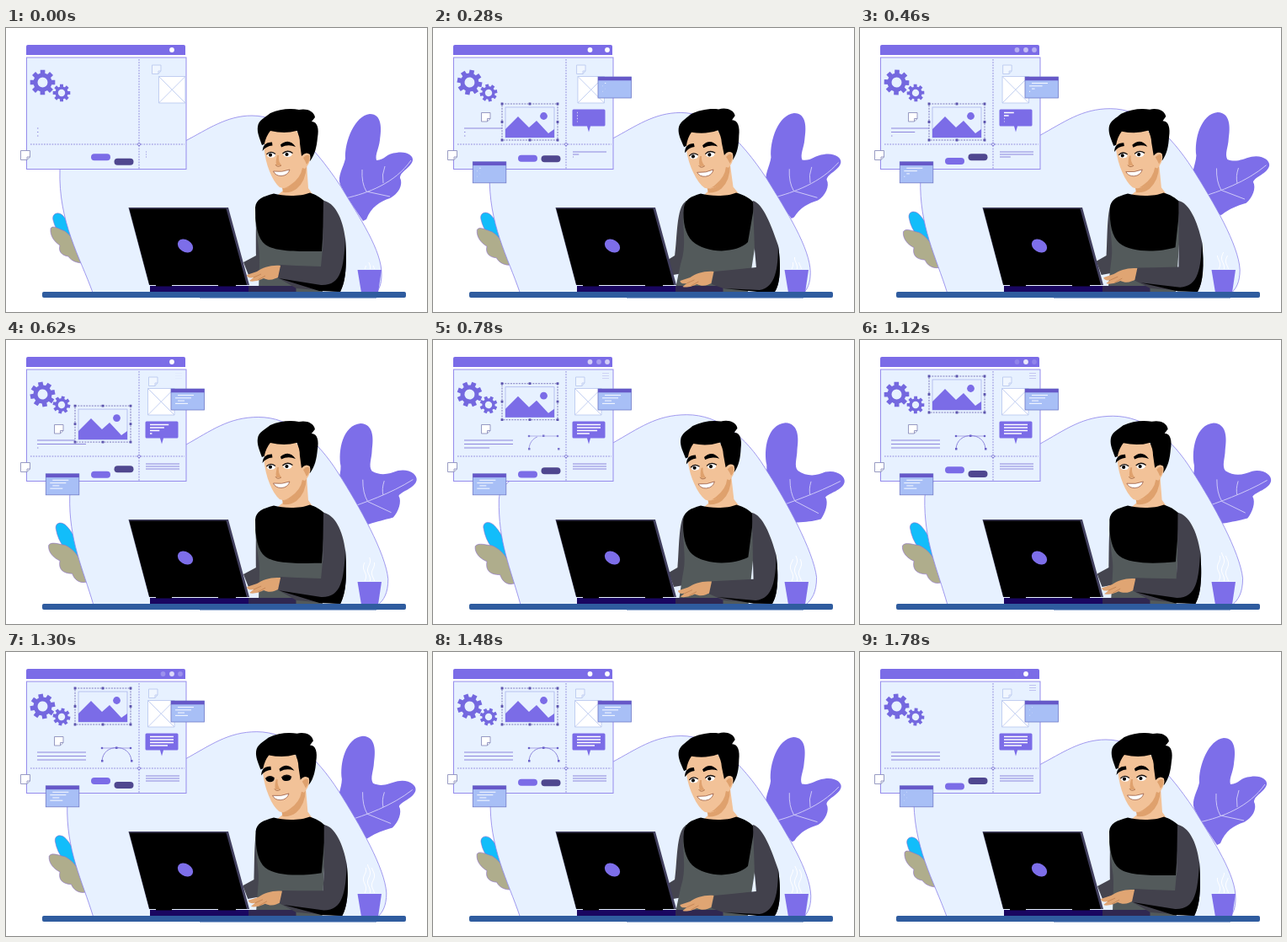
An HTML page for the animation above (1800 ms loop, 500x337 px).

```html
<!DOCTYPE html>
<html lang="en">
<head>
<meta charset="utf-8">
<title>Designer at work</title>
<style>
html, body { margin: 0; width: 100%; height: 100%; overflow: hidden; background: #fff; }
svg { display: block; width: 100%; height: 100%; }
.line { fill: none; stroke: #8d86dc; stroke-width: 1; }
.thin { stroke-width: .7; }
.faint { stroke: #c0c2f1; }
.pale { fill: #fff; stroke: #bccaf0; stroke-width: .9; }
.vein { fill: none; stroke: #cfcaf8; stroke-width: 1; }
.white { fill: none; stroke: #fff; stroke-width: 1.5; }
</style>
</head>
<body>
<svg viewBox="0 0 500 337">
  <!-- plants behind the backdrop -->
  <g stroke="#8b70cf" stroke-width=".6">
    <path fill="#12bdfa" data-by="swell"
      d="M56 228 C54 221 61 217 67 222 C76 231 80 246 82 258 C70 252 59 242 56 228Z"
      data-to="M60 222 C60 215 68 214 74 221 C84 232 88 245 90 262 C74 254 63 242 60 222Z"/>
    <path fill="#afad8c" data-by="swell"
      d="M53 238 C55 233 64 239 70 241 C80 248 89 264 92 279 C84 279 77 276 74 271 C66 270 62 265 64 258 C58 254 52 247 53 238Z"
      data-to="M50 245 C54 240 64 244 70 244 C86 250 96 270 98 289 C88 293 82 286 80 279 C68 279 62 274 64 263 C56 260 49 253 50 245Z"/>
  </g>
  <path fill="#7d6ee9" data-by="swell"
    d="M424 229 L404 199 L397 186 C393 176 401 165 403 155 C402 135 414 104 432 102 C447 102 446 120 444 133 C443 143 438 150 440 157 C450 157 452 148 464 148 C476 146 484 152 483 157 C481 166 468 170 468 178 C472 186 466 197 456 202 C444 206 434 212 428 227Z"
    data-to="M432 216 L414 203 L394 182 C391 172 397 160 396 148 C392 130 396 100 418 98 C434 99 434 116 432 130 C432 140 428 149 433 155 C444 163 456 162 466 157 C480 154 490 162 489 169 C487 179 470 182 466 187 C470 193 466 206 461 213 C450 216 444 216 432 216Z"/>
  <path class="vein" data-by="swell"
    d="M403 202 C430 196 462 184 481 157 M428 194 Q422 184 423 168 M428 194 L456 200 M448 184 Q446 174 450 164"
    data-to="M404 200 C425 192 455 182 484 168 M430 191 Q424 181 424 165 M430 191 L458 206 M448 184 Q446 178 449 168"/>

  <path fill="#e7f1ff" stroke="#8b80ea" stroke-width=".8" data-by="swell"
    d="M103 314 C88 272 62 230 64 168 C64 140 180 150 213 134 C240 120 262 104 292 104 C330 104 362 135 397 187 C420 225 447 265 446 293 C446 304 443 310 440 314Z"
    data-to="M104 314 C92 270 78 240 79 190 C80 150 180 138 213 122 C245 104 265 88 302 88 C340 88 372 114 394 150 C420 190 452 250 456 281 C456 300 450 308 443 314Z"/>

  <!-- design window -->
  <path fill="#7b6ce7" d="M24 32 V22 Q24 20 26 20 H211 Q213 20 213 22 V32Z"/>
  <g fill="#fff">
    <circle class="outer" cx="186.500" cy="26" r="2.900"/>
    <circle class="inner" cx="197" cy="26" r="2.900"/>
    <circle class="outer" cx="207" cy="26" r="2.900"/>
  </g>
  <rect x="24.500" y="35" width="189.500" height="132.500" fill="#e7f1ff" stroke="#958bec"/>
  <path class="line" stroke-dasharray="1.700 1.500" d="M158 37 V167 M29 138 H212"/>
  <circle cx="158" cy="138" r="1.600" fill="#e7f1ff" stroke="#7165cf" stroke-width=".8"/>
  <g id="big"></g>
  <g id="small"></g>
  <path fill="#fff" stroke="#8d90bd" stroke-width=".9" d="M17.500 145.500 H28.500 V153 L25 156.500 H17.500Z M25 156.500 V153 H28.500"/>
  <path id="memo" class="pale" fill-opacity=".4" d="M169.500 44 H180 V51 L177 54.500 H169.500Z M177 54.500 V51 H180"/>
  <path id="box" class="pale" d="M168.500 57.500 H200 V89 H168.500Z L200 89 M200 57.500 L168.500 89"/>
  <path id="menu" class="line faint" d="M201 39.500 H209 M201 42.500 H209 M201 45.500 H209" opacity="0"/>

  <g class="line">
    <path class="draw" data-on="0 310" d="M37 119 H95"/>
    <path class="draw" data-on="310 620" d="M37 123.500 H95"/>
    <path class="draw" data-on="620 930" d="M37 128 H95"/>
    <path class="draw" data-on="0 200" d="M166 147 H206"/>
    <path class="draw" data-on="250 420" d="M166 150 H206"/>
    <path class="draw" data-on="400 590" d="M166 153 H206"/>
  </g>

  <path class="pop" data-at="110 230" data-out="1610 1750" fill="#fff" stroke="#8d90bd" stroke-width=".9"
    d="M57.500 100.500 H68 V107.500 L64.500 111 H57.500Z M64.500 111 V107.500 H68"/>

  <g class="pop" data-at="680 800" data-out="1610 1750">
    <path class="draw line" data-on="700 930" d="M114 129.500 C115 108 148 108 149 129.500"/>
    <path class="line thin" d="M114 114 H148"/>
    <path fill="#6a61c8" d="M113 128 h2.500 v2.500 h-2.500z M148 128 h2.500 v2.500 h-2.500z M130 112.500 h2.500 v2.500 h-2.500z"/>
    <g fill="#6a61c8"><circle cx="114" cy="114" r="1.300"/><circle cx="148" cy="114" r="1.300"/></g>
  </g>

  <g id="picture"><g class="pop" data-at="90 230" data-out="1610 1750">
    <rect width="66" height="43" fill="#e7f1ff" stroke="#716bb5" stroke-width=".9" stroke-dasharray="2 1.300"/>
    <rect x="4" y="4" width="58" height="36" fill="#e7f1ff" stroke="#aab4ec" stroke-width=".8"/>
    <path fill="#7b6ce7" d="M4 40 V30 L19 15 L32 28 L41 20 L55 35 L62 30 V40Z"/>
    <circle cx="49.500" cy="14.500" r="4.400" fill="#7b6ce7"/>
    <path id="handles" fill="#5e56ae"/>
  </g></g>

  <g class="pop" data-at="100 230">
    <path fill="#7b6ce7" d="M167 96.500 H203 Q204.500 96.500 204.500 98 V115 Q204.500 116.500 203 116.500 H187 L185 123.500 L183 116.500 H167 Q165.500 116.500 165.500 115 V98 Q165.500 96.500 167 96.500Z"/>
    <g class="white">
      <path class="draw" data-on="280 710" d="M171 100.500 H199"/>
      <path class="draw" data-on="380 780" d="M171 104 H199"/>
      <path class="draw" data-on="480 830" d="M171 107.500 H199"/>
      <path class="draw" data-on="590 860" d="M171 111 H192"/>
    </g>
  </g>
  <g id="cards"></g>
  <rect class="button" x="101" width="23" height="8" rx="4" fill="#7b6ce7"/>
  <rect class="button" x="128.500" width="23" height="8" rx="4" fill="#4f478f"/>

  <!-- cup and steam -->
  <path id="steam" fill="none" stroke="#fff" stroke-width="1"/>
  <path fill="#7d6ee9" d="M417.500 287 H446 L442 314 H422Z"/>

  <!-- body -->
  <path fill="#45454f" data-by="sway"
    d="M300 206 C296 212 297 255 297 270 L282 278 L288 293 L303 290Z"
    data-to="M300 206 C289 212 290 250 287 270 L279 275 L285 293 L303 290Z"/>
  <g class="head">
    <path fill="#f2c298" d="M328 180 L357 160 L359 190 L366 200 L345 212 L318 202 L329 193Z"/>
    <path fill="#dfa16d" d="M328 189 Q348 186 354 166 L357 164 Q356 182 345 191 Q338 196 329 195Z"/>
  </g>
  <path fill="#535a5b" data-by="sway"
    d="M300 205 L296 225 C298 255 302 262 301 280 L300 313 L376 313 L376 262 L380 210 L340 216Z"
    data-to="M300 205 L297 225 C298 250 300 262 294 280 L287 313 L374 313 L382 262 L384 210 L340 216Z"/>
  <path data-by="sway"
    d="M318 196.500 C305 200 297 203 296 213 C296 235 299 250 308 257 C320 266 350 265 375 265 L379 206 C372 200 368 198 361 195.500 C350 200 330 200 318 196.500Z"
    data-to="M318 196.500 C306 200 300 203 298 213 C296 230 300 245 308 253 C325 268 360 268 374 254 L382 208 C376 202 370 198 360 195.500 C350 200 330 200 318 196.500Z"/>

  <!-- head -->
  <g class="head">
    <path d="M304 139 C301 130 298 124 299 117 C300 109 308 106 314 101 C325 96 338 95 348 97 C356 95 366 98 367 106 L363 111 C370 111 372 120 370 130 C369 141 367 150 361 158 L350 152 L346 122Z"/>
    <path fill="#f2c298" d="M307 137 Q309 128 314 122 Q331 126 345 122 Q349 128 349 137 L351 152 Q356 146 361 150 Q363 157 357 165 L355 167 Q352 180 341 187 Q332 192 325 189 Q318 183 313 170 Q308 158 306.500 143Z"/>
    <path fill="#dfa16d" d="M353 154 Q358 149 360 152 Q361 158 357 162 Q355 157 353 154Z M352 166 Q350 178 338 186 Q333 190 328 190 Q344 190 351 180 Q355 174 355 167Z M322 151 Q320 158 321 163 L327 163 Q323 158 324 151Z"/>
    <path d="M304.500 146 Q305 135 316 135.500 L316.500 139.500 Q309 140 304.500 146Z M326 138.500 Q336 130 344 141 Q335 137.500 327 141.500Z"/>
    <g fill="#fff">
      <ellipse cx="315" cy="150.500" rx="4.800" ry="3.200"/>
      <ellipse cx="334.500" cy="149.700" rx="5.200" ry="3.300"/>
    </g>
    <g id="lids" opacity="0"><ellipse cx="315" cy="150.500" rx="5" ry="3.300"/><ellipse cx="334.500" cy="149.700" rx="5.500" ry="3.400"/></g>
    <circle cx="314" cy="150.700" r="2.100"/><circle cx="333.500" cy="150" r="2.100"/>
    <path fill="none" stroke="#17110f" stroke-width="1.300" d="M309.500 150 Q314 145 320 149.500 M328.500 149 Q334 143.800 340.500 148.500"/>
    <path fill="none" stroke="#a96d47" stroke-width=".9" d="M320 162 Q322 166 327 163"/>
    <path fill="#fff" stroke="#8f4e38" stroke-width=".7" d="M317.500 170 Q328 171.500 337 168 Q335 175 327 175.500 Q320 175.500 317.500 170Z"/>
  </g>

  <!-- desk and laptop -->
  <rect x="43" y="313" width="432" height="7" rx="2" fill="#2f5c9f"/>
  <path stroke="#5d82ba" stroke-width=".8" d="M230 320.300 H440"/>
  <path fill="#190660" d="M171 306 H289 V313 H171Z"/>
  <path fill="#302850" d="M288 306 H344.500 V313 H288Z"/>
  <path d="M178 303 H197 V306.500 H178Z M252 303 H273 V306.500 H252Z"/>
  <path fill="#42405e" d="M145.500 213 H264 L289 305 H170Z"/>
  <path d="M146.500 214.500 H261.500 L286 305 H170.500Z"/>
  <ellipse cx="213" cy="258.500" rx="9.800" ry="7.200" transform="rotate(32 213 258.500)" fill="#7d6ee9"/>

  <!-- near arm -->
  <path fill="#42414c" data-by="sway"
    d="M377 205 C390 207 400 225 403 250 C405 280 404 300 397 313 L345 309 L322 296 L326 281 L345 282 L374 283 L376 262Z"
    data-to="M380 205 C392 208 402 235 410 258 C414 285 412 305 406 313 L345 309 L331 304 L334 289 L355 287 L384 284 L382 262Z"/>
  <path data-by="sway"
    d="M403 250 C405 280 404 300 397 313 L372 312 L324 297 L374 305 C398 306 401 285 403 250Z"
    data-to="M410 258 C414 285 412 305 406 313 L385 313 L345 309 L388 311 C407 308 410 285 410 258Z"/>
  <g id="hand">
    <path fill="#e0a573" d="M326 282 C315 281 305 284 298 289 L286 293 C286 296 290 297 294 296 L289 300 C293 302 302 299 306 297 C314 301 320 297 323 296Z"/>
    <path fill="none" stroke="#b97a4d" stroke-width=".7" d="M294 296 L303 292 M299 299 L308 294"/>
  </g>
</svg>
<script>
const LOOP = 1800, TAU = Math.PI * 2;
const $ = s => document.querySelector(s);
const $$ = s => [...document.querySelectorAll(s)];
const clamp = v => Math.min(1, Math.max(0, v));
const span = (t, [a, b]) => clamp((t - a) / (b - a));
const wave = (t, period) => (1 - Math.cos(TAU * t / period)) / 2;
const pair = s => s && s.split(' ').map(Number);

function keys(t, steps) {
  const i = steps.findIndex(k => k[0] > t);
  if (i < 1) return steps[i < 0 ? steps.length - 1 : 0][1];
  const [a, b] = [steps[i - 1], steps[i]];
  return a[1] + (b[1] - a[1]) * span(t, [a[0], b[0]]);
}

function buildGear(id, r, hole) {
  let teeth = '';
  for (let a = 0; a < 360; a += 45)
    teeth += `<rect x="${-r * .19}" y="${-r}" width="${r * .38}" height="${r * .4}" transform="rotate(${a})"/>`;
  $(id).innerHTML = `<g fill="#7468df">${teeth}<circle r="${r * .74}"/></g><circle r="${hole}" fill="#e7f1ff"/>`;
}

function card(x, y) {
  const rows = [[8, 27], [5, 24], [8, 16], [5, 20]];
  const lines = rows.map(([a, b], i) =>
    `<path class="draw" data-on="${270 + i * 60} ${430 + i * 60}" data-off="1610 1770" d="M${a} ${7.5 + i * 3.3} H${b}"/>`).join('');
  return `<g transform="translate(${x} ${y})"><g class="pop" data-at="100 230">
    <rect width="39.500" height="25" fill="#a8bff6" stroke="#6f7ac9" stroke-width=".8"/>
    <rect width="39.500" height="4.300" fill="#6658c8"/>
    <g fill="none" stroke="#f1f6ff" stroke-width="1.100">${lines}</g></g></g>`;
}

buildGear('#big', 14.8, 6);
buildGear('#small', 10.3, 4.2);
$('#cards').innerHTML = card(196, 58) + card(47.3, 158.8);

let squares = '';
for (const x of [0, 33, 66])
  for (const y of [0, 21.5, 43])
    if (x !== 33 || y !== 21.5) squares += `M${x - 1.4} ${y - 1.4}h2.800v2.800h-2.800z`;
$('#handles').setAttribute('d', squares);

const NUM = /-?\d+(\.\d+)?/g;
const morphs = $$('[data-to]').map(el => ({
  el, by: el.dataset.by, from: el.getAttribute('d'), to: el.dataset.to.match(NUM).map(Number)
}));
const timed = sel => $$(sel).map(el => ({
  el, on: pair(el.dataset.on || el.dataset.at), off: pair(el.dataset.off || el.dataset.out)
}));
const draws = timed('.draw'), pops = timed('.pop');
const buttons = $$('.button');
const shown = (t, p) => span(t, p.on) * (p.off ? 1 - span(t, p.off) : 1);
const move = (id, value) => $(id).setAttribute('transform', value);

function steamPath(t) {
  const height = keys(t, [[0, 9], [280, 14], [620, 28], [960, 35], [1300, 36], [1480, 34], [1800, 24]]);
  let d = '';
  [426, 431, 436].forEach((x, i) => {
    const top = height - Math.abs(i - 1) * 5;
    for (let h = 0; h <= top; h += 2)
      d += `${h ? 'L' : 'M'}${(x + 1.6 * Math.sin(h / 3.5 + i)).toFixed(1)} ${286 - h}`;
  });
  return d;
}

function render(t) {
  const level = { sway: wave(t, 600), swell: wave(t, LOOP) };
  const { sway } = level;
  for (const m of morphs) {
    let i = 0;
    m.el.setAttribute('d', m.from.replace(NUM, n => (+n + (m.to[i++] - n) * level[m.by]).toFixed(2)));
  }
  for (const p of draws) p.el.setAttribute('stroke-dasharray', `${Math.max(.025, shown(t, p))} 2`);
  for (const p of pops) p.el.setAttribute('opacity', shown(t, p));

  $$('.head').forEach(el => el.setAttribute('transform', `rotate(${-4 * sway} 335 225)`));
  move('#hand', `translate(${7.5 * sway} ${7 * sway})`);
  $$('.outer').forEach(el => el.setAttribute('opacity', sway));
  $('.inner').setAttribute('opacity', 1 - sway);

  const turn = 360 * t / LOOP;
  move('#big', `translate(43.5 64.5) rotate(${turn})`);
  move('#small', `translate(66 77) rotate(${-turn})`);

  const slide = (1 - span(t, [0, 580])) ** 2;
  move('#box', `translate(${13 * slide} 0)`);
  move('#memo', `translate(${4 * slide} 0)`);
  move('#picture', `translate(82 ${90 - 47 * wave(span(t, [480, 900]), 2)})`);
  buttons[0].setAttribute('y', 149 + 7 * wave(t - 80, 1200));
  buttons[1].setAttribute('y', 149 + 6 * wave(t + 670, 1200));
  $('#menu').setAttribute('opacity', keys(t, [[580, 0], [900, 1], [1100, 1], [1250, 0], [1500, 0], [1720, 1]]));
  $('#lids').setAttribute('opacity', keys(t, [[1230, 0], [1270, 1], [1330, 1], [1370, 0]]));
  $('#steam').setAttribute('d', steamPath(t));
}

$$('.draw').forEach(el => el.setAttribute('pathLength', 1));
const start = performance.now();
function tick() {
  render((performance.now() - start) % LOOP);
  requestAnimationFrame(tick);
}
tick();
</script>
</body>
</html>
```
